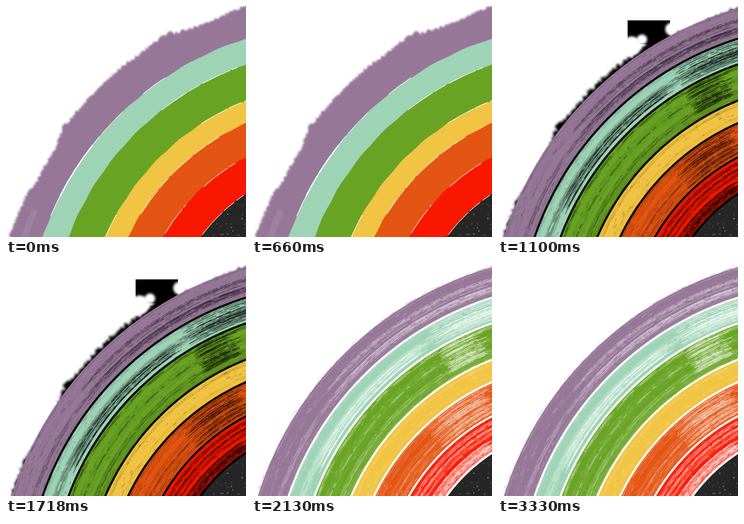
An HTML page with a canvas that plays this animation: 300 px wide and 289 px high, repeating every 4.13 s.

```html
<!DOCTYPE html>
<html>
<head>
<meta charset="utf-8">
<style>
  html, body { margin: 0; width: 100%; height: 100%; overflow: hidden; background: #fff; }
  canvas { display: block; }
</style>
</head>
<body>
<canvas id="stage" width="300" height="289"></canvas>
<script>
const ctx = document.getElementById('stage').getContext('2d');
const CX = 419, CY = 417, DEG = Math.PI / 180;

// Bands from the outside in: outer radius, colour, how worn the paint is
const bands = [
  { r: 431, color: '#977798', wear: 0.45 },
  { r: 394.5, color: '#9ed3b6', wear: 0.4 },
  { r: 364, color: '#69a324', wear: 0.6 },
  { r: 321.5, color: '#f1c443', wear: 0.4 },
  { r: 295.5, color: '#e45412', wear: 0.75 },
  { r: 257, color: '#f81800', wear: 0.8 },
  { r: 217.5, color: '#262626' }
];
// Extra worn patches: inner and outer radius, start and end angle, hairs
const patches = [
  [367, 392, 239, 258, 55], [367, 380, 205, 238, 30], [328, 362, 238.6, 249, 75],
  [400, 418, 218, 258, 22], [260, 293, 226, 245, 70], [243, 252, 205, 245, 22],
  [217, 232, 208, 240, 50]
];
// Torn outer silhouette: angle, radius
const torn = [[190, 435], [197, 434], [204, 433], [208, 429], [214, 430], [217.4, 438],
  [220, 436], [225, 437], [230.4, 437.5], [234.4, 436.5], [238.6, 439.5], [241.1, 441],
  [241.4, 436], [244.7, 431], [249, 430.5], [254, 434.5], [261, 436]];

let seed;
function rnd() {
  seed = (seed + 0x6D2B79F5) | 0;
  let t = Math.imul(seed ^ seed >>> 15, 1 | seed);
  t ^= t + Math.imul(t ^ t >>> 7, 61 | t);
  return ((t ^ t >>> 14) >>> 0) / 4294967296;
}
const between = (a, b) => a + rnd() * (b - a);

function tornRadius(a) {
  const i = Math.max(1, torn.findIndex(p => p[0] >= a));
  const [a0, r0] = torn[i - 1], [a1, r1] = torn[i];
  return r0 + (r1 - r0) * (a - a0) / (a1 - a0);
}

function sector(radiusAt, color, blur = 0) {
  ctx.filter = blur ? `blur(${blur}px)` : 'none';
  ctx.fillStyle = color;
  ctx.beginPath();
  ctx.moveTo(CX, CY);
  for (let a = 190; a <= 260; a += 0.2) {
    const r = radiusAt(a);
    ctx.lineTo(CX + r * Math.cos(a * DEG), CY + r * Math.sin(a * DEG));
  }
  ctx.fill();
  ctx.filter = 'none';
}

function arc(r, from, to, width, color, alpha = 1, dash = []) {
  ctx.globalAlpha = alpha;
  ctx.lineWidth = width;
  ctx.strokeStyle = color;
  ctx.setLineDash(dash);
  ctx.beginPath();
  ctx.arc(CX, CY, r, from * DEG, to * DEG);
  ctx.stroke();
  ctx.globalAlpha = 1;
  ctx.setLineDash([]);
}

function dot(x, y, r, color, blur = 0) {
  ctx.filter = blur ? `blur(${blur}px)` : 'none';
  ctx.fillStyle = color;
  ctx.beginPath();
  ctx.arc(x, y, r, 0, 7);
  ctx.fill();
  ctx.filter = 'none';
}

function specks() {
  seed = 77;
  for (let i = 0; i < 260; i++) {
    const a = between(212, 240) * DEG, r = between(130, 215);
    ctx.globalAlpha = between(0.1, 0.9);
    dot(CX + r * Math.cos(a), CY + r * Math.sin(a), between(0.15, 0.75), '#ddd');
  }
  ctx.globalAlpha = 1;
}

// Long bristle marks whose strength drifts across each band
function streaks(ink) {
  seed = 2024;
  for (let i = 0; i < 6; i++) {
    const { r: outer, wear } = bands[i], inner = bands[i + 1].r;
    let drift = 0.3;
    for (let r = inner + 2; r < outer - 2; r += 0.6) {
      drift = Math.min(1, Math.max(0, drift + between(-0.35, 0.35)));
      const dash = [between(10, 90), between(1, 12), between(4, 40), between(2, 25)];
      arc(r, between(180, 196), 260, between(0.4, 0.9), ink, drift * drift * wear, dash);
    }
    for (let n = 0; n < 260 * wear; n++) {
      const start = between(194, 256);
      arc(between(inner, outer), start, start + between(0.1, 1), 0.6, ink, between(0.1, 0.6));
    }
  }
  for (const [inner, outer, from, to, hairs] of patches) {
    for (let n = 0; n < hairs; n++) {
      const start = from + rnd() * rnd() * (to - from) * 0.5;
      arc(between(inner, outer), start, to - rnd() * 4, between(0.4, 1), ink, between(0.15, 0.65),
        [between(5, 40), between(1, 8), between(2, 15), between(1, 5)]);
    }
  }
}

function inkedBands(ink) {
  bands.forEach(({ r, color }, i) => {
    if (i) sector(() => r + 1.3, ink);
    sector(() => i ? r - 1.3 : r, color);
  });
  streaks(ink);
  specks();
}

function flatScene() {
  seed = 5;
  sector(a => tornRadius(a) + between(-2, 2), bands[0].color, 1.1);
  for (const { r, color } of bands.slice(1)) {
    sector(a => r + 0.4 * Math.sin(a * 0.9 + r), color);
  }
  const gaps = [[394.5, 203, 226], [394.5, 231, 236], [364, 232, 249], [321.5, 203, 209],
    [321.5, 237, 250], [295.5, 212, 239], [257, 211, 221], [257, 228, 239], [217.5, 217, 236]];
  for (const [r, from, to] of gaps) arc(r, from, to, 1, '#fff', 0.85, [38, 2, 17, 4]);
  arc(394.5, 207, 218, 1.6, '#fff');
  arc(416, 197, 203, 8, '#fff', 0.07);
  specks();
}

function darkScene() {
  seed = 9;
  sector(a => tornRadius(a) - 2 + between(-3, 3), '#000', 1.8);
  for (let a = 196; a < 256; a += between(1.5, 4)) {
    const r = tornRadius(a) + between(1, 4);
    dot(CX + r * Math.cos(a * DEG), CY + r * Math.sin(a * DEG), between(2, 4), '#fff', 2);
  }
  ctx.fillStyle = '#000';
  ctx.fillRect(162, 18, 53, 30);
  dot(167, 50, 12, '#fff', 1.5);
  dot(180, 42, 6.5, '#fff', 1.5);
  dot(217, 29, 8, '#fff', 1.5);
  inkedBands('#000');
}

function lightScene() {
  inkedBands('#fff');
  seed = 31;
  for (let i = 0; i < 170; i++) {
    const start = between(195, 255);
    arc(430.5 + 6 * rnd() * rnd() * rnd(), start, start + between(0.1, 1.5),
      between(0.3, 0.8), bands[0].color, between(0.15, 0.7));
  }
}

const scenes = [[1100, flatScene], [2130, darkScene], [4130, lightScene]];
let shown;
function frame() {
  const t = performance.now() % 4130;
  const scene = scenes.find(([end]) => t < end)[1];
  if (scene !== shown) {
    shown = scene;
    ctx.fillStyle = '#fff';
    ctx.fillRect(0, 0, 300, 289);
    scene();
  }
  requestAnimationFrame(frame);
}
frame();
</script>
</body>
</html>
```
